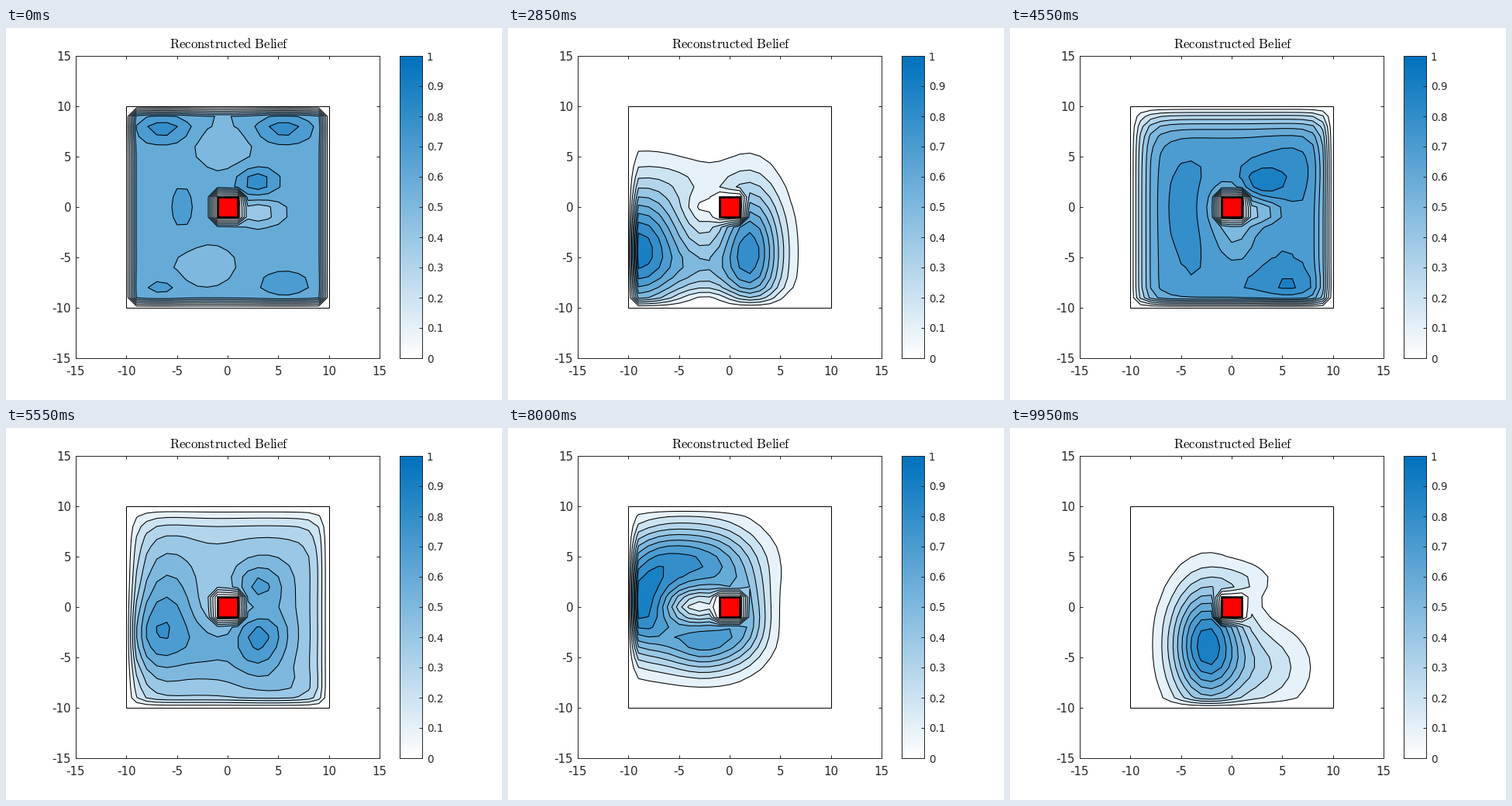
Animation, 640 px wide and 480 px high, one loop 10 s. Source, as a matplotlib script:

```python
import numpy as np
import matplotlib
import matplotlib.pyplot as plt
from matplotlib.animation import FuncAnimation
from matplotlib.colors import LinearSegmentedColormap
from matplotlib.patches import Rectangle

W, H, PT = 640, 480, 0.72
FRAMES, STEP = 200, 50
INK = "#262626"
matplotlib.rcParams.update({
    "font.family": "DejaVu Sans",
    "mathtext.fontset": "cm",
    "axes.unicode_minus": False,
})

CMAP = LinearSegmentedColormap.from_list("belief", ["white", "#0072bd"])
LEVELS = np.arange(0, 1.05, 0.1)

axis = np.arange(-10, 11)
GX, GY = np.meshgrid(axis, axis)
REACH = np.maximum(abs(GX), abs(GY))


def bump(x, y, sx, sy, height):
    return height * np.exp(-((GX - x) / sx) ** 2 - ((GY - y) / sy) ** 2)


def plateau(height, left, right, bottom, top):
    """Flat belief that falls to zero at each wall with its own softness."""
    across = np.tanh((10 + GX) / left) * np.tanh((10 - GX) / right)
    return height * across * np.tanh((10 + GY) / bottom) * np.tanh((10 - GY) / top)


def bounded(z):
    """No belief on the outer wall or inside the block."""
    return np.where((REACH == 10) | (REACH <= 1), 0, np.clip(z, 0, 0.99))


# Features shared by both wide-spread states
hills = (bump(2.9, 2.5, 2, 1.4, .24) + bump(5.6, -7.7, 2.8, 1.5, .13)
         + bump(-4.5, 0, 2, 4, .08) + bump(3, -.5, 2.2, 1.2, -.24))

spread = (plateau(.64, .5, .5, .5, .5) + hills
          + bump(-6.4, 7.8, 2.8, 1.4, .22) + bump(5.5, 7.8, 2.8, 1.4, .22)
          + bump(-.5, 6, 3, 2.3, -.13) + bump(-2.4, -5.8, 3, 2, -.13)
          + bump(-6.5, -8, 2, 1.2, .1))

floor_ridge = (bump(-4.6, -3, 3.5, 6.8, .46) + bump(-.5, 2.8, 3, 1.8, .2)
               + bump(6.2, -.3, 2.35, 4.9, .64)
               + bump(-3.5, -9.3, 5, 1.5, .78) + bump(6.6, -9.3, 3, 1.6, .7))

twin_low = (bump(-9, -4.3, 4.8, 6.4, .97) + bump(2, -4.5, 3.2, 6.6, .87)
            + bump(-3, -6, 3, 2.5, .26) + bump(-4, 2.8, 4, 2.5, .1)
            + bump(-2, 0, 2, 1.3, -.16) + bump(0, -9.6, 7, 1.2, -.22))

refilled = (plateau(.8, 2, 1.3, .75, 2.3) + hills
            + bump(0, 0, 2.6, 2.6, -.3) + bump(.4, -3.6, 2, 2.4, -.16)
            + bump(6, 4, 3, 3, .07))

twin_mid = (bump(-7.3, -3.1, 3.4, 3.8, .68) + bump(-6.5, 1.5, 3.4, 5, .4)
            + bump(2.8, -3.2, 3.3, 3.8, .84) + bump(3, 1.5, 3.2, 4, .36)
            + bump(-2, -4, 3, 3, .35))

wall_arc = (bump(-9, 0, 3.5, 4.5, .87) + bump(-7, 5, 4, 3.5, .4)
            + bump(-2, 4.2, 5, 4, .68) + bump(-2.5, -3.4, 4.6, 3.2, .74)
            + bump(1.5, -.5, 2.4, 3.5, .38) + bump(-3, 0, 3, 1.5, -.42))

comma = (bump(-2.5, -3.7, 3.5, 6, .95) + bump(3.2, -6, 4.5, 4.2, .28)
         + bump(1.6, 2.8, 3, 1.8, .13))

TIMES = [0, 1700, 2850, 4550, 6650, 8000, 9950]
FIELDS = [bounded(z) for z in
          (spread, floor_ridge, twin_low, refilled, twin_mid, wall_arc, comma)]


def belief(ms):
    k = min(np.searchsorted(TIMES, ms, side="right") - 1, len(TIMES) - 2)
    u = (ms - TIMES[k]) / (TIMES[k + 1] - TIMES[k])
    return FIELDS[k] * (1 - u) + FIELDS[k + 1] * u


def pixel_axes(left, top, right, bottom):
    box = [left / W, 1 - bottom / H, (right - left) / W, (bottom - top) / H]
    ax = fig.add_axes(box)
    for spine in ax.spines.values():
        spine.set(linewidth=PT, color=INK)
    return ax


fig = plt.figure(figsize=(W / 100, H / 100), dpi=100, facecolor="white")

plot = pixel_axes(90, 36, 482, 426)
ticks = range(-15, 16, 5)
plot.set(xlim=(-15, 15), ylim=(-15, 15), xticks=ticks, yticks=ticks,
         xticklabels=map(str, ticks), yticklabels=map(str, ticks))
plot.tick_params(direction="in", top=True, right=True, length=4 * PT, width=PT,
                 color=INK, labelcolor=INK, labelsize=15 * PT)
plot.tick_params(axis="x", pad=9.5 * PT)
plot.tick_params(axis="y", pad=6 * PT)
plot.add_patch(Rectangle((-10, -10), 20, 20, fill=False, ec="black", lw=PT, zorder=3))
plot.add_patch(Rectangle((-1, -1), 2, 2, fc="red", ec="black", lw=2.7 * PT, zorder=4))
fig.text(288 / W, 1 - 26.5 / H, r"$\mathrm{Reconstructed\ Belief}$",
         fontsize=16.8 * PT, color="black", ha="center", va="baseline")

bar = pixel_axes(508, 36, 537, 426)
bar.imshow(np.linspace(0, 1, 256)[:, None], cmap=CMAP, origin="lower",
           extent=(0, 1, 0, 1), aspect="auto")
bar.set(xticks=[], yticks=LEVELS, yticklabels=[f"{v:.1g}" for v in LEVELS])
bar.yaxis.tick_right()
bar.tick_params(axis="y", direction="in", length=4 * PT, width=PT, pad=6 * PT,
                color=INK, labelcolor=INK, labelsize=13.5 * PT)

drawn = []


def draw(i):
    while drawn:
        drawn.pop().remove()
    z = belief(i * STEP)
    drawn.append(plot.contourf(GX, GY, z, LEVELS, colors=CMAP(LEVELS[:-1]), zorder=1))
    drawn.append(plot.contour(GX, GY, z, LEVELS[1:-1], colors="black",
                              linewidths=1.05 * PT, zorder=2))
    return drawn


anim = FuncAnimation(fig, draw, frames=FRAMES, interval=STEP, repeat=True,
                     repeat_delay=0, init_func=lambda: [], blit=False)
plt.show()
```
